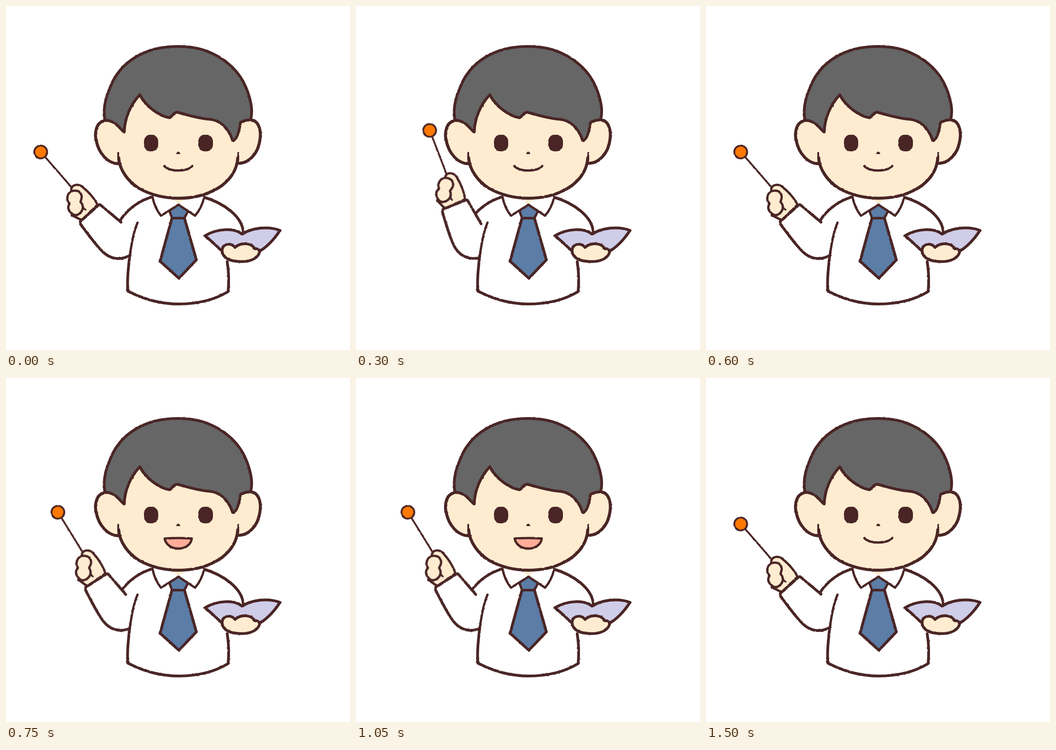
These frames come from a looping animation (748x748 px, 1.65 s). An HTML page:

```html
<!DOCTYPE html>
<html lang="en">
<head>
<meta charset="utf-8">
<title>Teacher with pointer</title>
<style>
  html, body { margin: 0; width: 100%; height: 100%; overflow: hidden; background: #fff; }
  svg { display: block; width: 100%; height: 100%; }
  .ink { fill: none; stroke: #4a2525; stroke-width: 6; stroke-linecap: round; stroke-linejoin: round; }
  .bold { stroke-width: 6.5; }
  .mid { stroke-width: 5; }
  .thin { stroke-width: 4; }
  .dark { fill: #4a2525; }
  .skin { fill: #ffecd0; }
  .hair { fill: #666; }
  .shirt { fill: #fff; }
  .tie { fill: #5b7da6; }
  .book { fill: #cfcde8; }
  .ball { fill: #ff7800; }
  .tongue { fill: #ffad98; }
</style>
</head>
<body>
<svg viewBox="0 0 748 748">
  <filter id="rough" filterUnits="userSpaceOnUse" x="0" y="0" width="748" height="748" color-interpolation-filters="sRGB">
    <feTurbulence type="fractalNoise" baseFrequency=".2" seed="4"/>
    <feDisplacementMap in="SourceGraphic" scale="2.5" xChannelSelector="R" yChannelSelector="G"/>
  </filter>

  <g class="ink" filter="url(#rough)">
    <path d="M318 415C285 425 262 445 247 468"/>
    <path d="M431 416C472 428 514 457 516 492"/>
  </g>

  <g id="arm">
    <g class="ink" filter="url(#rough)">
      <path class="thin" d="M85 328L144 396"/>
      <circle class="ball thin" cx="75.5" cy="317.5" r="14"/>
      <path class="skin mid" d="M142 397C146 386 160 387 168 395C181 405 193 420 199 432L165 466L143 455Z"/>
      <path class="skin mid" d="M137 407C143 400 156 400 161 406C167 413 164 420 162 426C169 433 168 442 163 448C156 457 146 456 142 450C134 444 134 436 138 430C132 423 132 413 137 407Z"/>
      <path class="thin" d="M166 432Q167 440 173 443"/>
      <path class="shirt" d="M250 470L206 433Q203 431 200 434L162 468Q160 471 163 476C181 499 200 527 217 540C234 552 252 552 270 542"/>
    </g>
  </g>

  <g class="ink" filter="url(#rough)">
    <path class="mid" d="M286 471C276 495 273 520 269 543"/>
    <path d="M269 543C266 570 263 595 265 620C300 638 335 648 375 648C420 648 455 638 483 621C485 600 484 575 481 556"/>
    <path class="tie" d="M361 461L335 555L376 592L414 552L388 461Z"/>
    <path class="tie mid" d="M375 432L355 445L361 461H388L396 446Z"/>
    <path class="shirt mid" d="M319 417C322 432 329 446 337 456L375 432M431 416C427 432 420 446 411 456L375 432"/>
    <path class="skin" stroke="none" d="M355 416L375 430L394 416Z"/>
    <path class="book" d="M432 500C460 483 497 482 513 496C535 482 570 478 596 488C580 512 565 525 552 533H470C455 520 445 508 432 500Z"/>
    <path class="skin" d="M498 525C490 514 472 516 470 530C469 543 480 553 500 555C525 558 545 552 551 537C552 530 547 527 541 528C535 516 512 512 498 525Z"/>

    <path class="skin" stroke="none" d="M218 249C196 250 192 275 196 292C202 322 222 342 243 343C251 365 268 384 290 397C318 412 345 418 375 418C415 418 445 408 470 390C487 376 498 362 504 342C527 342 548 322 552 292C556 268 548 248 532 248L440 180H290Z"/>
    <g class="bold">
      <path d="M218 249C196 250 192 275 196 292C202 322 222 342 243 343"/>
      <path d="M532 248C548 248 556 268 552 292C548 322 527 342 506 342"/>
      <path d="M245 330C247 358 267 383 290 397C318 412 345 418 375 418C415 418 445 408 470 390C490 374 502 356 504 330"/>
    </g>
    <path class="thin" d="M244 319V336M505 319V336"/>
    <path class="hair" d="M215 248C211 225 216 200 226 178C247 122 302 87 375 88C446 87 505 128 525 185C533 208 537 228 532 247Q520 248 510 253C507 272 502 292 493 293C484 265 465 247 440 246C410 243 390 235 372 231C365 231 361 240 356 243C335 240 305 220 291 193C270 215 258 245 257 274C245 265 240 250 215 248Z"/>
  </g>

  <g filter="url(#rough)">
    <path class="dark" d="M370 322C371 315 378 315 379 322Z"/>
    <g id="open" class="dark">
      <rect x="300" y="280" width="31" height="36" rx="13" ry="15"/>
      <rect x="418" y="280" width="32" height="36" rx="13" ry="15"/>
    </g>
    <path id="shut" class="ink mid" d="M295 297Q315 306 336 297M413 297Q434 306 454 297"/>
    <path id="smile" class="ink mid" d="M344 348C355 361 394 361 405 348"/>
    <path id="talk" class="ink tongue mid" d="M345 349Q375 347 404 349C402 364 388 371 374 371C360 371 347 362 345 349Z"/>
  </g>
</svg>
<script>
  const STEP = 150, STEPS = 11, BLINK = 9;
  const ANGLES = [0, 9.3, 20, 9.3];
  const el = id => document.getElementById(id);
  const show = (id, on) => { el(id).style.display = on ? "" : "none"; };

  function draw(now) {
    const step = Math.floor(now / STEP) % STEPS;
    const pose = step < 8 ? step % 4 : 0;
    const talking = pose % 2 === 1;
    el("arm").setAttribute("transform", `rotate(${ANGLES[pose]} 251 534)`);
    show("talk", talking);
    show("smile", !talking);
    show("shut", step === BLINK);
    show("open", step !== BLINK);
  }

  const start = performance.now();
  function tick() {
    draw(performance.now() - start);
    requestAnimationFrame(tick);
  }
  tick();
</script>
</body>
</html>
```
